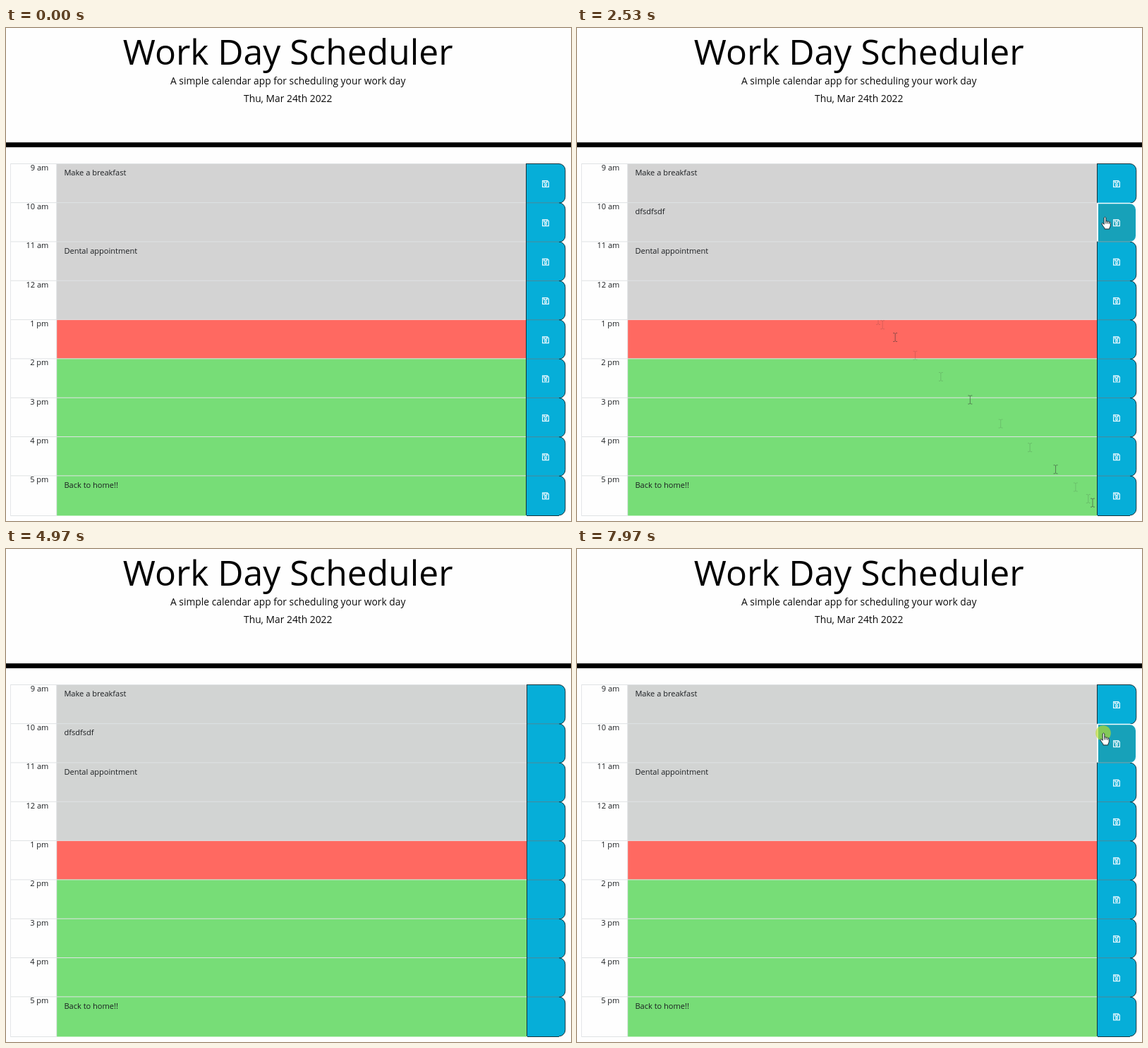
Animation of 801x699 px, one loop 7990 ms. Source, as an HTML page with a canvas:

```html
<!DOCTYPE html>
<html lang="en">
<head>
<meta charset="utf-8">
<title>Work Day Scheduler</title>
<style>
html, body { margin: 0; width: 100%; height: 100%; overflow: hidden; background: #fefefe; }
canvas { display: block; width: 801px; height: 699px; }
</style>
</head>
<body>
<canvas id="stage" width="801" height="699"></canvas>
<script>
const ctx = document.getElementById('stage').getContext('2d');
const LOOP = 7990, TOP = 192, ROW = 55.32, MID = 399.7;
const OPEN = '"Open Sans", sans-serif', ARIAL = '"Liberation Sans", Arial, sans-serif';
const BODY = '11.06px ' + OPEN;
const INK = '#1b1e21', RULE = '#dfe2e4', BLUE = '#06aed8', TEAL = '#17a1b9';
const HOURS = ['9 am', '10 am', '11 am', '12 am', '1 pm', '2 pm', '3 pm', '4 pm', '5 pm'];
const NOTES = { 0: 'Make a breakfast', 2: 'Dental appointment', 8: 'Back to home!!' };
const WORD = 'dfsdfsdf';

// moments in ms
const ENTER = 210, FOCUS = 1070, TYPE = 1345, SAVE = 2400, BLUR = 3500;
const RELOAD = 4890, PAGE = 4910, ICONS = 5000;
const REFOCUS = 6060, PICK = 6280, ERASE = 6930, RESAVE = 7940;

const GLIDES = [
  { from: ENTER, to: 1000, a: [751, 692], b: [326, 286], bend: 33 },
  { from: FOCUS, to: 2280, a: [326, 286], b: [748, 268], bend: 0 },
  { from: 2900, to: 3190, a: [748, 268], b: [812, 276], bend: 0 },
  { from: 5310, to: 5910, a: [784, 348], b: [307, 297], bend: -65 },
  { from: 7140, to: 7920, a: [307, 297], b: [746, 261], bend: 0 }
];

const rowY = i => TOP + ROW * i;
const within = (t, a, b) => t >= a && t < b;
const clamp = (v, lo, hi) => Math.min(hi, Math.max(lo, v));
const smooth = k => k * k * (3 - 2 * k);

function along({ a, b, bend }, k) {
  return {
    x: a[0] + (b[0] - a[0]) * k,
    y: a[1] + (b[1] - a[1]) * k + bend * Math.sin(Math.PI * k * k)
  };
}

function pointer(t) {
  const g = GLIDES.filter(m => m.from <= t).pop();
  return g && along(g, smooth(clamp((t - g.from) / (g.to - g.from), 0, 1)));
}

function box(x, y, w, h, color) {
  ctx.fillStyle = color;
  ctx.fillRect(x, y, w, h);
}

function text(s, x, y, font, color = INK, align = 'left') {
  ctx.font = font;
  ctx.fillStyle = color;
  ctx.textAlign = align;
  ctx.fillText(s, x, y);
}

function stroke(path, color, width = 1) {
  ctx.strokeStyle = color;
  ctx.lineWidth = width;
  ctx.stroke(path);
}

function clipped(x, y, w, h, paint) {
  ctx.save();
  ctx.beginPath();
  ctx.rect(x, y, w, h);
  ctx.clip();
  paint();
  ctx.restore();
}

function header(loaded) {
  const font = loaded ? OPEN : ARIAL;
  text('Work Day Scheduler', MID, loaded ? 52 : 49, '49.77px ' + font, '#000', 'center');
  text('A simple calendar app for scheduling your work day', MID, 80, '13.83px ' + font, '#0a0a0a', 'center');
  if (loaded) text('Thu, Mar 24th 2022', MID, 105, '13.83px ' + font, '#0a0a0a', 'center');
  box(0, loaded ? 162.2 : 137.4, 801, 6.9, '#000');
}

function disk(x, y) {
  const p = new Path2D(`M${x - 4.4} ${y - 4.4}h7l1.8 1.8v7h-8.8z`);
  p.rect(x - 2.3, y - 4.2, 4.2, 2.7);
  p.moveTo(x + 1.4, y + 1.5);
  p.arc(x, y + 1.5, 1.4, 0, 7);
  stroke(p, '#eefaff', 1.2);
}

function button(i, left, icons, hover, ring) {
  const y = rowY(i), shape = new Path2D();
  const pad = ring ? 1.2 : .5;
  shape.roundRect(left + pad, y + pad, 792.8 - pad - left, ROW + 1 - pad, [0, 9, 9, 0]);
  ctx.fillStyle = hover ? TEAL : BLUE;
  ctx.fill(shape);
  if (ring) {
    stroke(shape, '#f4fbfd', 1.6);
  } else {
    clipped(784, y, 12, ROW + 2, () => stroke(shape, '#17333c'));
    box(left, y, 1, ROW + 1, '#17333c');
    box(left + 1, y, 783 - left, 1, i ? '#4c8797' : '#17333c');
  }
  if (icons) disk(765, y + 29);
}

function grid(t, at) {
  const icons = !within(t, PAGE, ICONS);
  const left = icons ? 737 : 738;
  const gray = t < RELOAD ? '#d3d3d3' : '#d2d4d3';
  const over = at && at.x > 738 && at.x < 793 ? Math.floor((at.y - TOP) / ROW) : -1;
  const ring = within(t, SAVE, BLUR) || t >= RESAVE;
  HOURS.forEach((hour, i) => {
    const y = rowY(i);
    box(72, y, left - 72, ROW + 1.6, i < 4 ? gray : i === 4 ? '#ff6961' : '#77dd77');
    box(6, y - (i ? .2 : 0), left - 6, 1, RULE);
    text(hour, 60.4, Math.round(y + 9.8), BODY, INK, 'right');
    if (NOTES[i]) text(NOTES[i], 82.4, Math.round(y + 17.2), BODY);
  });
  box(6, 691, 65, 1, RULE);
  box(6, TOP, 1, 500, '#e4e6e8');
  box(71.2, TOP, 1, 500, RULE);
  HOURS.forEach((_, i) => button(i, left, icons, over === i, ring && i === 1));
  box(left + 1, 691, 783 - left, 1, '#17333c');
}

function squiggle(x0, x1, y) {
  const p = new Path2D();
  for (let x = x0; x <= x1; x++) p.lineTo(x, y + (x % 2 ? .5 : -.3));
  stroke(p, '#e0484c');
}

function entry(t) {
  const focus = within(t, FOCUS, SAVE) || within(t, REFOCUS, RESAVE);
  const picked = within(t, PICK, ERASE);
  const count = t < ERASE ? clamp(Math.floor((t - TYPE) / 75), 0, WORD.length) : 0;
  const word = WORD.slice(0, count);
  ctx.font = BODY;
  const end = 82.4 + ctx.measureText(word).width;
  if (picked) box(82, 252.6, end - 82, 15, '#2f8cf5');
  text(word, 82.4, 264, BODY, picked ? '#fff' : INK);
  if (within(t, 2670, RELOAD) || within(t, REFOCUS, ERASE)) squiggle(82, end, 266.2);
  if (!focus) return;
  const edge = new Path2D();
  edge.roundRect(72.5, 248, 664, 60, 2);
  clipped(70, 245, 670, 57.2, () => stroke(edge, '#000', 1.5));
  const touched = [FOCUS, TYPE + 600, REFOCUS, ERASE].filter(m => m <= t).pop();
  const typing = within(t, TYPE, TYPE + 600);
  if (!picked && (typing || (t - touched) % 1000 < 500)) box(Math.round(end), 253, 1, 14, '#111');
}

function beam(x, y, alpha = 1) {
  const p = new Path2D(`M${x} ${y - 5}v10`);
  for (const s of [-1, 1]) p.addPath(new Path2D(`M${x - 3} ${y + 6 * s}h2l1 ${-s}l1 ${s}h2`));
  ctx.globalAlpha = alpha;
  stroke(p, '#333');
  ctx.globalAlpha = 1;
}

function hand(x, y) {
  ctx.save();
  ctx.translate(x, y);
  const p = new Path2D('M-1.3 1Q0-.8 1.3 1V6Q2.6 5 3.6 6.4Q5 5.6 5.9 7Q7.6 6.4 7.8 8.4V12Q7.6 14 6.4 15.6V17H-.6V15.6Q-3 13-4.6 9.6Q-4.4 7.8-2.6 9L-1.3 10.4Z');
  ctx.fillStyle = '#fff';
  ctx.fill(p);
  stroke(p, '#1c2a2e');
  stroke(new Path2D('M1.3 6V9.5M3.6 6.6V9.5M5.9 7.2V9.8'), '#1c2a2e');
  ctx.restore();
}

// faint pointer marks along the first sweep, left until the page reloads
function marks(t, at) {
  if (!within(t, ENTER, RELOAD)) return;
  clipped(72, 414, 665, 277, () => {
    for (let i = 0; i < 12; i++) {
      const x = 579 + 152 * Math.cos(Math.PI * i / 11);
      if (t < FOCUS && at.x > x - 3) continue;
      const { y } = along(GLIDES[0], (751 - x) / 425);
      beam(x, y, .3 + .25 * Math.sin(i * 2.1 + 1.5));
    }
  });
}

function cursor(t, at) {
  if (!at) return;
  if ([FOCUS, SAVE, REFOCUS, RESAVE].some(m => within(t, m, m + 120))) {
    ctx.fillStyle = 'rgba(190,222,40,.66)';
    ctx.beginPath();
    ctx.arc(at.x, at.y, 10.8, 0, 7);
    ctx.fill();
  }
  if (at.x > 738 && at.x < 793) hand(at.x + .5, at.y);
  else if (at.x <= 738) beam(Math.round(at.x) + .5, Math.round(at.y) + .5);
}

function draw(t) {
  box(0, 0, 801, 699, '#fefefe');
  const loaded = !within(t, RELOAD, PAGE);
  header(loaded);
  if (!loaded) {
    text('Have a great day!', MID, 176, 'bold 11.06px ' + ARIAL, '#5f6b70', 'center');
    return;
  }
  const at = pointer(t);
  grid(t, at);
  entry(t);
  marks(t, at);
  cursor(t, at);
}

const start = performance.now();
function frame() {
  draw((performance.now() - start) % LOOP);
  requestAnimationFrame(frame);
}
frame();
</script>
</body>
</html>
```
